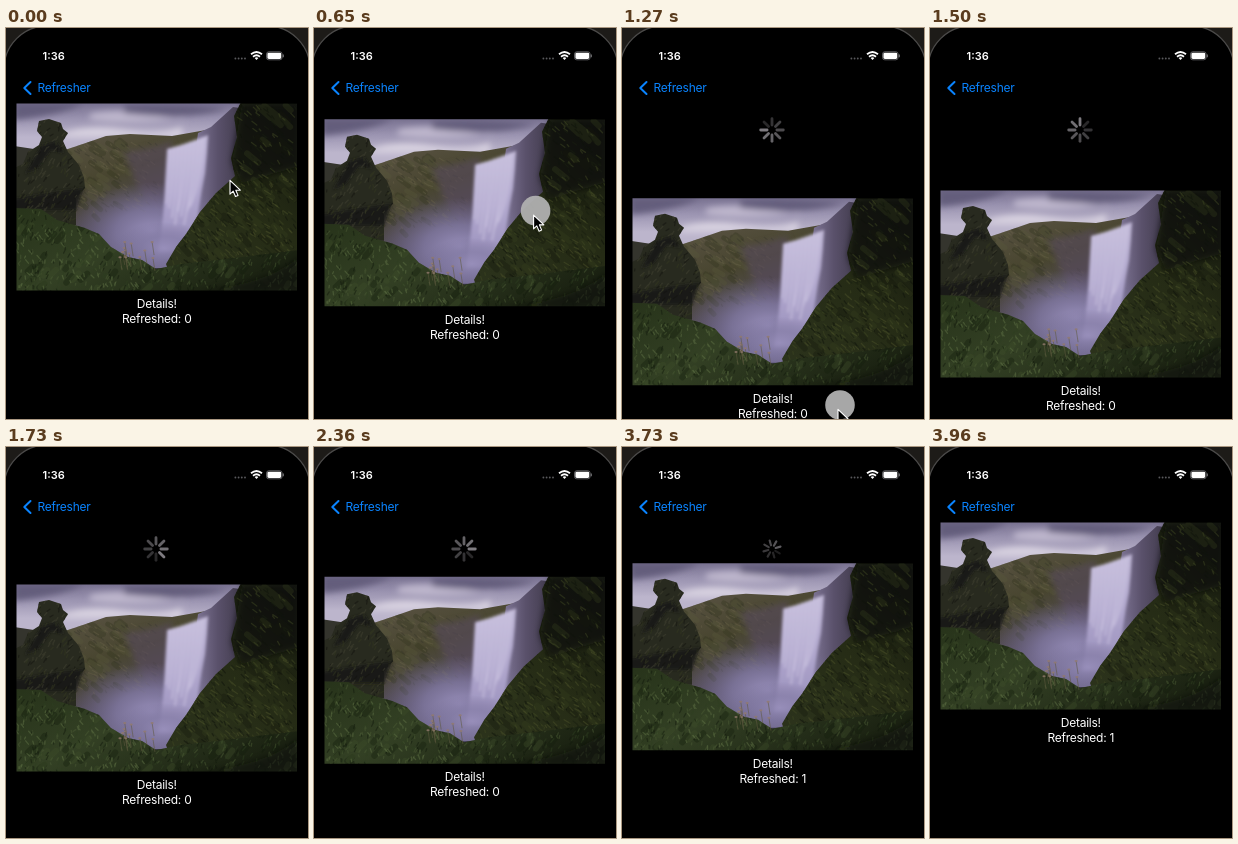
Recreate the animation shown at these times as an HTML page. Size 302x391 px, loop 4760 ms.

```html
<!DOCTYPE html>
<html lang="en">
<head>
<meta charset="utf-8">
<title>Pull to refresh</title>
<style>
  html, body { margin: 0; width: 100%; height: 100%; overflow: hidden; background: #000; }
  svg { display: block; width: 302px; height: 391px; }
  text { font-family: Inter, Roboto, sans-serif; font-size: 12px; letter-spacing: -.25px; fill: #fff; }
  .mid { text-anchor: middle; }
</style>
</head>
<body>
<svg viewBox="0 0 302 391">
  <defs>
    <linearGradient id="sky" x2="0" y2="1">
      <stop offset="0" stop-color="#716a89"/><stop offset=".35" stop-color="#9a93b0"/><stop offset=".7" stop-color="#bcb5cc"/>
    </linearGradient>
    <linearGradient id="hill" x2=".35" y2="1">
      <stop offset="0" stop-color="#5b5445"/><stop offset=".4" stop-color="#48452f"/><stop offset=".75" stop-color="#554d60"/><stop offset="1" stop-color="#70688c"/>
    </linearGradient>
    <linearGradient id="veil">
      <stop offset="0" stop-color="#9188ab"/><stop offset=".4" stop-color="#5a516b"/><stop offset="1" stop-color="#25222a"/>
    </linearGradient>
    <linearGradient id="fall" x2="0" y2="1">
      <stop offset="0" stop-color="#c3bbd9"/><stop offset=".5" stop-color="#b0a7cd"/><stop offset="1" stop-color="#978dba"/>
    </linearGradient>
    <linearGradient id="slope" x1="1" x2=".3" y2="1">
      <stop offset="0" stop-color="#10130c"/><stop offset=".5" stop-color="#252b15"/><stop offset="1" stop-color="#2b321b"/>
    </linearGradient>
    <linearGradient id="grass" x2="1" y2=".5">
      <stop offset="0" stop-color="#27331a"/><stop offset=".45" stop-color="#334024"/><stop offset="1" stop-color="#1b2212"/>
    </linearGradient>
    <radialGradient id="mist">
      <stop offset="0" stop-color="#978eb9"/><stop offset=".45" stop-color="#827aa3" stop-opacity=".8"/><stop offset="1" stop-color="#746c92" stop-opacity="0"/>
    </radialGradient>
    <filter id="soft" x="-20%" y="-20%" width="140%" height="140%"><feGaussianBlur stdDeviation="3"/></filter>
    <filter id="spray" x="-20%" y="-20%" width="140%" height="140%"><feGaussianBlur stdDeviation="1.6"/></filter>
    <filter id="fine"><feGaussianBlur stdDeviation=".5"/></filter>
    <clipPath id="frame"><path d="M10.5 75.5H291V262.5H10.5Z"/></clipPath>
    <clipPath id="inRock"><use href="#rock"/></clipPath>
    <clipPath id="inHill"><use href="#ridge"/></clipPath>
    <clipPath id="inSlope"><use href="#bank"/></clipPath>
    <clipPath id="inGrass"><use href="#meadow"/></clipPath>
  </defs>

  <rect width="302" height="391" fill="#1d1b18"/>
  <rect x="-2" y="-2" width="306" height="500" rx="43" stroke="#4b4a49" stroke-width="1.3"/>

  <g id="page">
    <g clip-path="url(#frame)"><g filter="url(#fine)">
      <path fill="url(#sky)" d="M8 72H294V125H8Z"/>
      <g filter="url(#soft)">
        <path fill="#d9d3e1" d="M56 106Q80 96 118 102T176 99V109H58Z"/>
        <path fill="#bdb6cc" d="M84 86Q110 80 146 87T178 90Q120 98 84 92Z"/>
        <path fill="#645d7c" d="M8 74H78Q62 86 8 92ZM118 77Q165 74 222 80Q180 93 118 85Z"/>
      </g>
      <path fill="#34342d" d="M8 118L28 121L40 155H8Z"/>
      <path id="ridge" fill="url(#hill)" d="M56 123Q80 115 100 108L124 106L166 108L200 102V240H56Z"/>
      <g id="hillTex" clip-path="url(#inHill)"/>
      <path fill="#584c5f" opacity=".6" filter="url(#soft)" d="M118 124Q145 121 166 113V195Q142 180 130 155Z"/>
      <path fill="url(#veil)" d="M192 105L205 99L227 79L262 84L235 170L178 212Z"/>
      <ellipse cx="146" cy="203" rx="80" ry="49" fill="url(#mist)"/>
      <g filter="url(#spray)">
        <path fill="url(#fall)" d="M161 121Q177 117 190 112L202 107Q201 126 199 145Q192 178 188 224H152Q158 190 159 155Z"/>
        <g id="streaks" fill="none" stroke="#ddd6ee" stroke-width="1.6" opacity=".5"/>
      </g>
      <ellipse cx="158" cy="220" rx="50" ry="26" fill="url(#mist)" opacity=".8"/>
      <path id="bank" fill="url(#slope)" d="M294 72H236L228 88L231 109L225 130L229 148L210 165L194 184L180 206L170 219L160 236L170 265H294Z"/>
      <path fill="#0c0f0a" opacity=".65" filter="url(#soft)" d="M236 76H294V138L263 147L236 156L226 134Z"/>
      <g id="bankTex" clip-path="url(#inSlope)"/>
      <path id="rock" fill="#282a1f" d="M8 140L17 136L22 124L33 117L36 109L31 103L33 93L43 91L55 95L57 101L62 105L57 113L62 124L73 137L78 150L79 160L70 170V197H8Z"/>
      <path fill="#181914" opacity=".8" filter="url(#spray)" d="M36 117L50 113L58 125L45 122L32 140L19 146ZM8 171L48 164L78 160L70 182H8Z"/>
      <g id="rockTex" clip-path="url(#inRock)"/>
      <path id="meadow" fill="url(#grass)" d="M8 180L35 181L51 192L79 200L93 206L105 219L122 229L136 232L150 241L175 236L220 231L294 222V265H8Z"/>
      <g id="grassTex" clip-path="url(#inGrass)"/>
      <path fill="#0b0e08" opacity=".5" filter="url(#soft)" d="M294 228Q255 262 165 264H294Z"/>
      <g id="flowers" opacity=".8"/>
    </g></g>
    <text class="mid" x="150.8" y="280.2">Details!</text>
    <text class="mid" x="150.8" y="295" id="count">Refreshed: 0</text>
  </g>

  <g id="spinner" stroke="#fbf6ff" stroke-width="2.8" stroke-linecap="round"/>

  <text x="36.5" y="32" style="font-size:11px;font-weight:600;letter-spacing:0">1:36</text>
  <path d="M24.5 54L18.3 60L24.5 66" fill="none" stroke="#0a84ff" stroke-width="2" stroke-linecap="round" stroke-linejoin="round"/>
  <text x="31.5" y="64" style="fill:#0a84ff">Refresher</text>
  <path d="M229.4 30.5H240" stroke="#59595c" stroke-width="1.9" stroke-linecap="round" stroke-dasharray="0 3.2"/>
  <g fill="none" stroke="#fff" stroke-width="1.8">
    <path d="M245 26.3Q250.5 21.7 256 26.3M247 28.7Q250.5 25.8 254 28.7"/>
    <path d="M248.6 30L250.5 32L252.4 30Q250.5 28.6 248.6 30Z" fill="#fff" stroke="none"/>
  </g>
  <rect x="260.5" y="23.8" width="15.6" height="8" rx="2.3" fill="none" stroke="#77777a" stroke-width=".8"/>
  <rect x="261.4" y="24.7" width="13.8" height="6.2" rx="1.4" fill="#fff"/>
  <path d="M277.3 26.4V29.2" stroke="#77777a" stroke-width="1.1"/>

  <circle id="touch" r="14.8" fill="#b0b0b0" opacity=".95"/>
  <path id="cursor" d="M0 .4V14.2L3.2 11.2L5.5 16.5L8 15.4L5.8 10.2H10.3Z" fill="#000" stroke="#fff" stroke-width="1.1" stroke-linejoin="round"/>
</svg>

<script>
const LOOP = 4760;
const $ = id => document.getElementById(id);

function add(parent, tag, attrs) {
  const el = document.createElementNS('http://www.w3.org/2000/svg', tag);
  for (const k in attrs) el.setAttribute(k, attrs[k]);
  return parent.appendChild(el);
}

// Seeded texture for the landscape
let seed = 17;
const rnd = (a, b) => {
  seed = (seed * 16807) % 2147483647;
  return a + (b - a) * seed / 2147483647;
};

function tufts(id, [x0, y0, x1, y1], n, colors, len, lean, width = 1.3, opacity = .5) {
  for (const stroke of colors) {
    let d = '';
    for (let i = 0; i < n; i++) {
      const l = rnd(len * .4, len), dx = l * lean + rnd(-2, 2);
      d += `M${rnd(x0, x1).toFixed(1)} ${rnd(y0, y1).toFixed(1)}l${dx.toFixed(1)} ${(-l).toFixed(1)}`;
    }
    add($(id), 'path', { d, stroke, fill: 'none', 'stroke-width': width, 'stroke-linecap': 'round', opacity });
  }
}

tufts('hillTex', [62, 116, 125, 195], 22, ['#33351f', '#57583a'], 9, -1.4, 5, .35);
tufts('hillTex', [62, 116, 155, 185], 75, ['#6a6349', '#35362a'], 3, -1.5, 1.2, .4);
tufts('bankTex', [165, 80, 291, 250], 45, ['#14190d', '#363d1e'], 10, -1.1, 6, .35);
tufts('bankTex', [165, 80, 291, 250], 190, ['#0e130a', '#3f4722', '#191f10'], 4, -.9);
tufts('bankTex', [180, 150, 291, 240], 80, ['#4a5129'], 4, -1.2);
tufts('rockTex', [11, 93, 79, 195], 85, ['#12130e', '#434332', '#343920'], 4, .6);
tufts('grassTex', [11, 185, 291, 266], 45, ['#161e0e', '#3d4b29'], 7, .8, 6, .4);
tufts('grassTex', [11, 185, 291, 266], 240, ['#131a0c', '#4a5a34', '#2f3f20'], 4, .3);
tufts('grassTex', [11, 200, 150, 266], 90, ['#5f7044'], 4, -.4);

for (let i = 0; i < 9; i++) {
  const x = 164 + i * 4;
  add($('streaks'), 'path', { d: `M${x} ${120 - i * 1.4}Q${x - 1} 155 ${160 + i * 3} ${rnd(175, 205)}` });
}
for (let i = 0; i < 13; i++) {
  const x = rnd(114, 150), y = rnd(213, 230);
  add($('flowers'), 'path', { d: `M${x} ${y}l2 13`, stroke: '#5f593f', 'stroke-width': .7 });
  add($('flowers'), 'ellipse', { cx: x, cy: y, rx: 1.6, ry: 1, fill: '#927a6c' });
}

const spokes = Array.from({ length: 8 }, (_, i) =>
  add($('spinner'), 'path', { d: 'M0-4.9V-11.3', transform: `rotate(${i * 45})` }));

// Redraw times: [first, last, steps]
const ticks = [0, 60];
for (const [a, b, n] of [[300, 820, 9], [880, 1390, 10], [1440, 1960, 10], [2020, 2360, 6],
                         [2480, 3040, 7], [3150, 3210, 2], [3330, 3620, 5], [3680, 3960, 6]])
  for (let i = 0; i < n; i++) ticks.push(Math.floor((a + (b - a) * i / (n - 1)) / 10) * 10);

// Drag: [time, page top, cursor x, cursor y]
const drag = [
  [0, 75, 224, 152], [60, 75, 224.3, 152], [300, 75, 224, 152.5], [400, 75.5, 223, 155],
  [580, 86, 220, 176], [820, 114, 217.6, 240], [930, 127.5, 217.2, 276],
  [1270, 169.7, 216, 381], [1420, 180, 216, 418]
];
const clamp = v => Math.min(1, Math.max(0, v));

function dragAt(t) {
  const i = drag.findIndex(k => k[0] > t);
  if (i < 0) return drag[drag.length - 1];
  const a = drag[i - 1], b = drag[i], p = (t - a[0]) / (b[0] - a[0]);
  return a.map((v, k) => v + (b[k] - v) * p);
}

const rest = 129, release = 1420, trigger = 1000, finish = 3620;

function render(time) {
  let t = 0;
  for (const s of ticks) if (s <= time) t = s;

  const [, pulled, x, y] = dragAt(t);
  const back = clamp((t - finish) / (3960 - finish));
  const eased = back * back * (3 - 2 * back);
  let top = pulled;
  if (t > release) top = rest + 51 * Math.exp((release - t) / 162);
  if (t > finish) top = rest - 54 * eased;
  $('page').setAttribute('transform', `translate(0 ${(top - 75).toFixed(2)})`);
  $('count').textContent = 'Refreshed: ' + (t >= finish ? 1 : 0);

  const head = Math.floor(6.3 + (t - 1270) / 92);
  spokes.forEach((s, i) => {
    const age = ((head - i) % 8 + 8) % 8;
    const level = t < trigger ? .3 * clamp((top - 100) / 30 * 8 - i) : .16 + .34 * (1 - age / 7);
    s.setAttribute('opacity', level.toFixed(3));
  });
  $('spinner').setAttribute('opacity', 1 - eased);
  $('spinner').setAttribute('transform',
    `translate(150 ${t < trigger ? 103.3 : 102}) scale(${1 - .9 * eased}) rotate(${eased * 120})`);

  $('cursor').setAttribute('transform', `translate(${x} ${y})`);
  $('touch').setAttribute('transform', `translate(${x + 2} ${y - 4})`);
  $('touch').style.display = t >= 300 && t < release ? '' : 'none';
  $('cursor').style.display = t < release ? '' : 'none';
}

const start = performance.now();
function loop() {
  render((performance.now() - start) % LOOP);
  requestAnimationFrame(loop);
}
loop();
</script>
</body>
</html>
```
